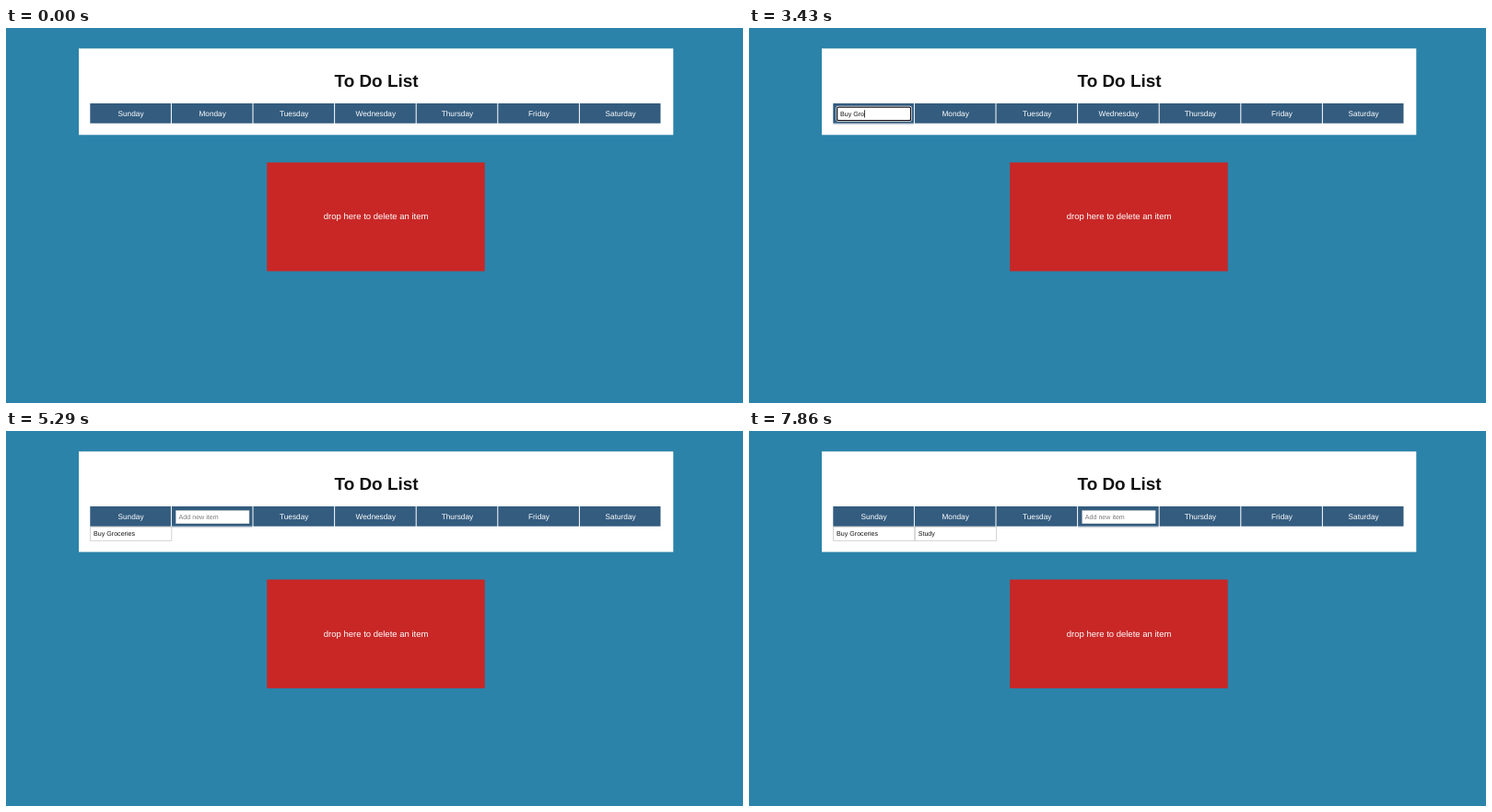
An HTML page with a canvas for the animation above (8 s loop, 800 by 408 pixels).

```html
<!DOCTYPE html>
<html lang="en">
<head>
<meta charset="utf-8">
<title>To Do List</title>
<style>
  html, body { margin: 0; width: 100%; height: 100%; overflow: hidden; background: #2b83a9; }
  canvas { display: block; }
</style>
</head>
<body>
<canvas id="stage" width="800" height="408"></canvas>
<script>
const ctx = document.getElementById('stage').getContext('2d');
const LOOP = 8000, LEFT = 91.3, PITCH = 88.6, ROW_HEIGHT = 15.3;
const DAYS = ['Sunday', 'Monday', 'Tuesday', 'Wednesday', 'Thursday', 'Friday', 'Saturday'];
const ITEMS = [
  { day: 0, text: 'Buy Groceries', at: 4710 },
  { day: 1, text: 'Study', at: 7140 }
];

// One state per keystroke; each keystroke restarts the caret blink.
const typing = (day, text, times) =>
  times.map((at, i) => ({ at, day, focus: true, text: text.slice(0, i + 1) }));

const STATES = [
  { at: 0, day: -1 },
  { at: 860, day: 0 },
  { at: 1000, day: 0, focus: true },
  ...typing(0, 'Buy Groceries',
    [1860, 2000, 2140, 2290, 3140, 3290, 3430, 3570, 3710, 3860, 4000, 4140, 4290]),
  { at: 4710, day: 0, focus: true },
  { at: 5140, day: 1 },
  { at: 5430, day: 1, focus: true },
  ...typing(1, 'Study', [6290, 6430, 6570, 6710, 6860]),
  { at: 7140, day: 1, focus: true },
  { at: 7570, day: 2 },
  { at: 7860, day: 3 }
];

function box(x, y, w, h, color) {
  ctx.fillStyle = color;
  ctx.fillRect(x, y, w, h);
}

function roundBox(x, y, w, h, r, color) {
  ctx.fillStyle = color;
  ctx.beginPath();
  ctx.roundRect(x, y, w, h, r);
  ctx.fill();
}

function label(text, x, y, size, color, align = 'center', weight = '') {
  ctx.font = `${weight} ${size}px "Liberation Sans", Arial, sans-serif`;
  ctx.textAlign = align;
  ctx.fillStyle = color;
  ctx.fillText(text, x, y);
}

function drawInput(x, { at, focus, text = '' }, time) {
  box(x, 104.2, 87.6, 1, '#c3ccd6');
  if (focus) {
    roundBox(x + 3.1, 84.8, 82.4, 17.2, 2.4, '#fff');
    roundBox(x + 3.8, 85.5, 81, 15.8, 1.9, '#101018');
    roundBox(x + 5, 86.7, 78.6, 13.4, 0.8, '#fff');
  } else {
    box(x + 4.2, 86.2, 80.2, 14.8, '#b4b7bb');
    box(x + 4.8, 86.8, 79, 13.6, '#fff');
  }
  const textX = x + 7.7;
  label(text || 'Add new item', textX, 95.7, 7.1, text ? '#111' : '#777', 'left');
  if (focus && (time - at) % 1000 < 500)
    box(textX + (text ? ctx.measureText(text).width : 0), 89.3, 0.8, 8.2, '#111');
}

function drawItem({ day, text }) {
  const x = LEFT + day * PITCH;
  ctx.strokeStyle = '#c8c8c8';
  ctx.lineWidth = 0.8;
  ctx.strokeRect(x + 0.3, 104.3, PITCH - 0.4, 15);
  label(text, x + 3.8, 114.4, 7.1, '#111', 'left');
}

function draw(time) {
  const state = STATES.findLast(s => s.at <= time);
  const items = ITEMS.filter(item => item.at <= time);
  const shift = items.length ? ROW_HEIGHT : 0;

  ctx.textRendering = 'geometricPrecision';
  box(0, 0, 800, 408, '#2b83a9');
  box(79, 22.3, 645.3, 94 + shift, '#fff');
  label('To Do List', 402, 63.8, 18.9, '#111', 'center', 'bold');

  items.forEach(drawItem);
  DAYS.forEach((name, day) => {
    const x = LEFT + day * PITCH;
    box(x, 82, 87.6, 21.7, '#335c7f');
    if (day === state.day) drawInput(x, state, time);
    else label(name, x + 44.2, 95.8, 8.27, '#fff');
  });

  box(283.2, 146.3 + shift, 236.5, 118.3, '#c82726');
  label('drop here to delete an item', 401.6, 208.3 + shift, 9.5, '#fff');
}

function tick() {
  draw(performance.now() % LOOP);
  requestAnimationFrame(tick);
}
tick();
</script>
</body>
</html>
```
